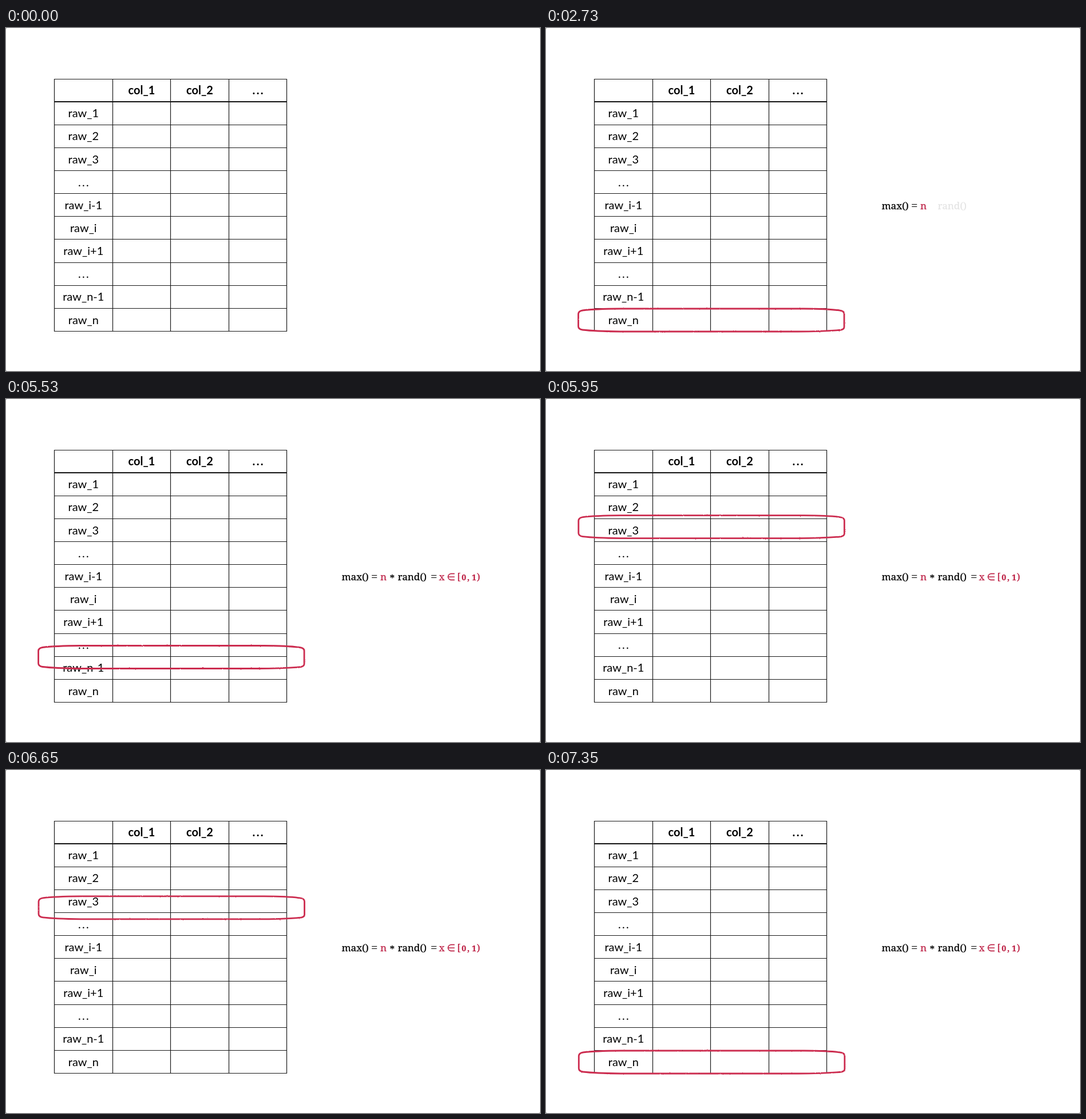
These frames come from a looping animation (933x600 px, 8 s). An HTML page:

```html
<!DOCTYPE html>
<html lang="en">
<head>
<meta charset="utf-8">
<title>Random row</title>
<style>
  html, body { margin: 0; width: 100%; height: 100%; overflow: hidden; background: #999; }
  svg { display: block; width: 933px; height: 600px; }
  #table text { font: 20px Lato, sans-serif; text-anchor: middle; }
  #table .head { font-weight: 700; }
  #table .dots { letter-spacing: 2.3px; }
  #formula { font: 500 17px "Noto Serif", serif; stroke: #000; stroke-width: .25px; }
  #formula .op { font: 19px "Liberation Serif", serif; }
  #formula .digit { font-size: 13.5px; font-weight: 700; }
  #formula .in { font: 17px "DejaVu Sans", sans-serif; stroke: none; }
  #formula .red { fill: #bd2246; stroke: #bd2246; }
</style>
</head>
<body>
<svg viewBox="0 0 933 600">
  <defs>
    <filter id="crayon" filterUnits="userSpaceOnUse" x="45" y="480" width="490" height="62" color-interpolation-filters="sRGB">
      <feTurbulence type="fractalNoise" baseFrequency=".35" numOctaves="2" seed="4"/>
      <feDisplacementMap in="SourceGraphic" scale="1.8" xChannelSelector="R" yChannelSelector="G"/>
    </filter>
  </defs>
  <rect width="933" height="600" rx="2" fill="#fff"/>
  <g id="table"></g>
  <g id="formula">
    <text id="max" x="586.5" y="317">max()</text>
    <g id="size">
      <text class="op" x="638.3" y="317">=</text>
      <text class="red" x="654" y="317">n</text>
    </g>
    <text id="star" x="670.5" y="320">*</text>
    <text id="rand" x="684.5" y="317">rand()</text>
    <g id="range">
      <text class="op" x="742.3" y="317">=</text>
      <text class="red" x="756.5" y="317">x</text>
      <text class="red in" x="770.5" y="317">∈</text>
      <text class="red" x="788.3" y="317">[</text>
      <text class="red digit" x="796.3" y="317">0</text>
      <text class="red" x="805.8" y="317">,</text>
      <text class="red digit" x="814" y="317">1</text>
      <text class="red" x="822.5" y="317">)</text>
    </g>
  </g>
  <g id="marker">
    <path filter="url(#crayon)" fill="none" stroke="#cc2c4f" stroke-width="2.8" stroke-linejoin="round"
      d="M56.5 500 Q57 495 64 494 Q85 491.3 130 491 L450 491 Q495 491.3 513 494 Q521 495 521 500
         L521 523 Q521 528 512 528.5 Q480 531 440 531 L130 531 Q85 530.5 64 528 Q56 527 56.5 521 Z"/>
  </g>
</svg>
<script>
const LOOP = 8000, STEP = 70, CLIMB = -362;
const $ = id => document.getElementById(id);

function buildTable() {
  const xs = [84.5, 186.5, 287.5, 389.5, 490.5];
  const rows = ['raw_1', 'raw_2', 'raw_3', '...', 'raw_i-1', 'raw_i', 'raw_i+1', '...', 'raw_n-1', 'raw_n'];
  const label = (text, x, y, cls = '') => {
    const dots = text === '...';
    return `<text class="${cls}${dots ? ' dots' : ''}" x="${dots ? x + 1.2 : x}" y="${y}">${text}</text>`;
  };
  let grid = 'M84 89.5H491', out = '';
  for (const x of xs) grid += `M${x} 89V531`;
  rows.forEach((name, i) => {
    grid += `M84 ${Math.floor(169.2 + 40.15 * i) + .5}H491`;
    out += label(name, 135.3, 156.2 + 40.15 * i);
  });
  ['col_1', 'col_2', '...'].forEach((name, i) => {
    out += label(name, (xs[i + 1] + xs[i + 2]) / 2, 115.7, 'head');
  });
  $('table').innerHTML =
    `<path d="${grid}" stroke="#1a1a1a" stroke-width="1.2" fill="none"/>` +
    `<path d="M84 129H491" stroke="#111" stroke-width="1.8"/>` + out;
}

const ramp = (t, start, end) => Math.min(1, Math.max(0, (t - start) / (end - start)));
const ease = u => (1 - Math.cos(Math.PI * u)) / 2;

// id: fade start, fade end
const fades = {
  max: [100, 490],
  size: [590, 980],
  marker: [1070, 1610],
  rand: [2680, 3150],
  range: [3240, 3640],
  star: [4780, 5180]
};

function draw(time) {
  const t = Math.floor(time % LOOP / STEP) * STEP;
  for (const id in fades) $(id).setAttribute('opacity', ramp(t, ...fades[id]));
  const up = ease(ramp(t, 5273, 6240));
  const down = ease(ramp(t, 6308, 7325));
  $('marker').setAttribute('transform', `translate(${.4 * (up + down)} ${CLIMB * (up - down)})`);
}

buildTable();
const begin = performance.now();
function tick() {
  draw(performance.now() - begin);
  requestAnimationFrame(tick);
}
tick();
</script>
</body>
</html>
```
